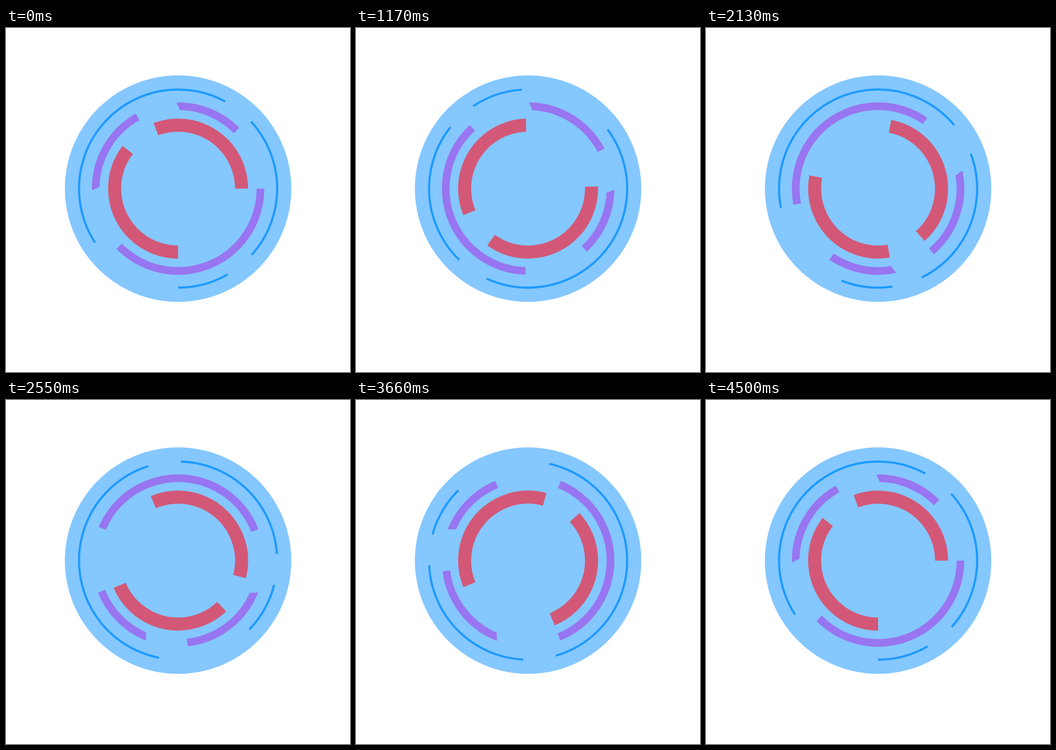
Animation, 748 px wide and 748 px high, one loop 4.53 s. Source, as an HTML page:

```html
<!DOCTYPE html>
<html lang="en">
<head>
<meta charset="utf-8">
<title>Orbiting rings</title>
<style>
  html, body { margin: 0; height: 100%; overflow: hidden; background: #fff; }
  svg { display: block; width: 100%; height: 100%; }

  .ring {
    fill: none;
    animation: spin 4530ms infinite;
  }
  .outer  { --turns: -2; stroke: #1e9aff; stroke-width: 4.7; }
  .middle { --turns: 1;  stroke: #9875f1; stroke-width: 16.6; }
  .inner  { --turns: -1; stroke: #d35877; stroke-width: 28.4; }

  /* 30 ms ticks: full turns are reached on tick 149, shown as the last pose */
  @keyframes spin {
    0% { rotate: 0deg; }
    0.662% { rotate: 0deg; animation-timing-function: steps(150); }
    100% { rotate: calc(var(--turns) * 360deg * 150 / 149); }
  }
</style>
</head>
<body>
<svg viewBox="0 0 748 748">
  <g transform="translate(374.2 349.2)">
    <circle r="246.2" fill="#85c7ff"/>
    <circle class="ring outer" r="215.4" pathLength="360" transform="rotate(60)"
      stroke-dasharray="30 57 151.4 19.1 84.5 18"/>
    <circle class="ring middle" r="179.2" pathLength="360"
      stroke-dasharray="135.6 44.4 60.5 29.5 45.2 44.8"/>
    <circle class="ring inner" r="138" pathLength="360" transform="rotate(90)"
      stroke-dasharray="127.5 32 110.5 90"/>
  </g>
</svg>
</body>
</html>
```
